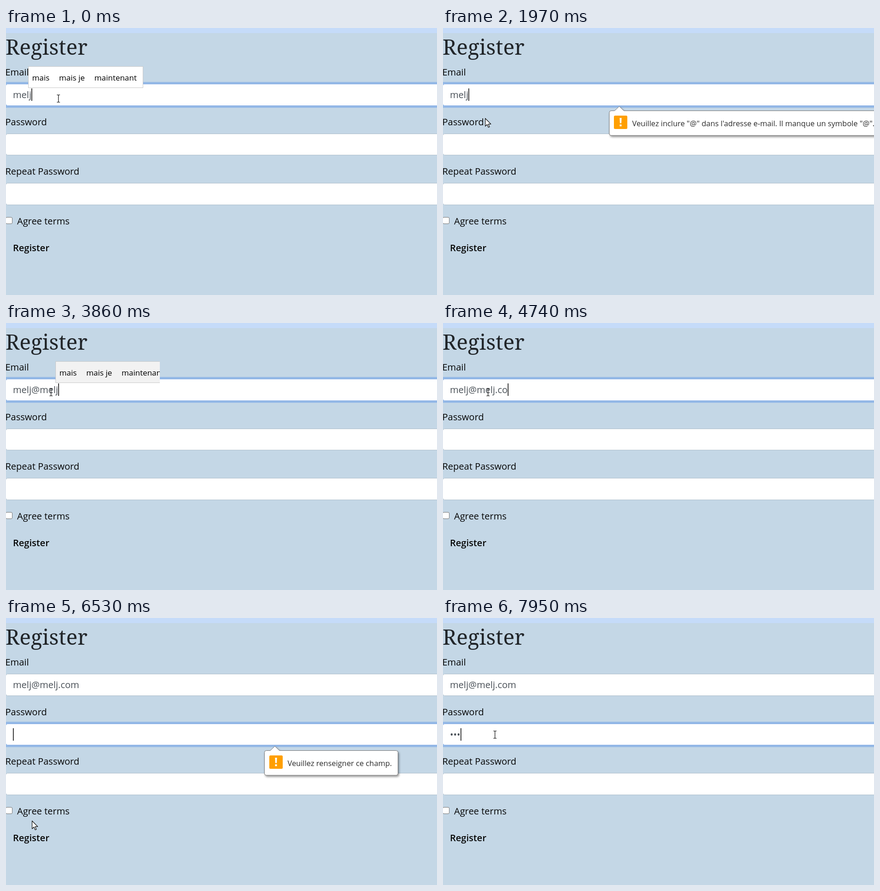
These frames come from a looping animation (933 px wide and 579 px high, 8 s). An HTML page:

```html
<!DOCTYPE html>
<html lang="en">
<head>
<meta charset="utf-8">
<title>Register form</title>
<style>
html, body { margin: 0; width: 100%; height: 100%; overflow: hidden; background: #c4d7e6; }
svg { position: absolute; left: 0; top: 0; }
text { font-family: "Open Sans", sans-serif; font-size: 20px; fill: #060606; }
.title { font-family: "Noto Serif", serif; font-size: 46px; fill: #212529; }
.button { font-weight: 600; }
.field { fill: #fff; stroke: #aebecb; }
.focus .field { stroke: #7fa9e4; }
.ring { fill: #95b9e6; visibility: hidden; }
.focus .ring { visibility: visible; }
.value { fill: #495057; }
.tip text { font-size: 16.4px; fill: #2c2c2c; }
.tip .box { fill: #fff; stroke: #777; }
.menu text { font-size: 16.8px; fill: #222; }
.dots { stroke: #222; stroke-width: 5; stroke-linecap: round; stroke-dasharray: 0 7.3; }
.shade { filter: drop-shadow(2px 3px 2px #0006); }
.cursor path { fill: #fff; stroke: #111; stroke-width: 1.2; stroke-linejoin: round; }
.cursor .beam { fill: none; }
#words {
  position: absolute; top: 83px; height: 45px; box-sizing: content-box;
  display: flex; gap: 20.5px; padding: 0 12.5px 0 7.5px;
  border: 1px solid #c9c9c9; white-space: nowrap; color: #000;
  font: 17px/47px "Open Sans", sans-serif;
}
</style>
</head>
<body>
<svg width="933" height="579" viewBox="0 0 933 579">
  <defs>
    <g id="globe">
      <circle r="9.5" fill="#5f6368"/>
      <path d="M-7.4-.8l5 4.8v3.2A7.6 7.6 0 0 1-7.4-.8M1-7.4v2l-2 2h-2v2h5l1.5 3.5 2.5.5.5 1.8A7.6 7.6 0 0 0 1-7.4" fill="#fff"/>
    </g>
    <g id="warn">
      <rect x="370" y="190" width="29" height="29" rx="2.5" fill="#ff9f00"/>
      <path d="M382.4 195h4.2l-.5 11.5h-3.2zM382.5 209.3h4v4h-4z" fill="#fff"/>
    </g>
  </defs>
  <rect width="933" height="579" fill="#c4d7e6"/>
  <rect width="933" height="11" fill="#c5dbf9"/>

  <text class="title" x="-1" y="58">Register</text>
  <text x="-1.5" y="103">Email</text>
  <text x="-1.5" y="211">Password</text>
  <text x="-1.5" y="318">Repeat Password</text>
  <text x="24" y="426">Agree terms</text>
  <text class="button" x="15" y="484">Register</text>
  <rect x="-.5" y="410.5" width="14" height="14" rx="2.5" fill="#fff" stroke="#767676"/>

  <g id="email">
    <rect class="ring" x="-5" y="117" width="960" height="56" rx="7"/>
    <rect class="field" x="-.5" y="121.5" width="960" height="47" rx="4"/>
    <text class="value" x="15" y="152"></text>
  </g>
  <g id="pass">
    <rect class="ring" x="-5" y="225" width="960" height="55" rx="7"/>
    <rect class="field" x="-.5" y="229.5" width="960" height="46" rx="4"/>
    <text class="value" x="15" y="259.5"></text>
  </g>
  <rect class="field" x="-.5" y="336.5" width="960" height="47" rx="4"/>
  <rect id="caret" width="1.6" height="27" fill="#111"/>

  <g id="menu" class="menu">
    <path class="shade" d="M0 276h284v239q0 4-4 4H0z" fill="#fff"/>
    <path d="M0 276.5h283" stroke="#aebecb"/>
    <path d="M0 462.5h284" stroke="#d9dbdd"/>
    <use href="#globe" x="26.5" y="327"/>
    <text x="54.5" y="319">dorimek@melj.com</text>
    <path class="dots" d="M58.3 343h45"/>
    <use href="#globe" x="26.5" y="407.5"/>
    <text x="54.5" y="399">dorimek</text>
    <path class="dots" d="M58.3 424h45"/>
    <text x="15" y="498">Gérer les mots de passe…</text>
  </g>

  <g id="tipMail" class="tip">
    <path class="box shade" d="M364 179.5h7.5l10-9.5 10 9.5H1000v53.5H364q-4 0-4-4v-45.5q0-4 4-4z"/>
    <use href="#warn"/>
    <text x="409.5" y="213">Veuillez inclure "@" dans l'adresse e-mail. Il manque un symbole "@".</text>
  </g>
  <g id="tipPass" class="tip" transform="translate(199.5 108)">
    <path class="box shade" d="M364 179.5h8.5l10-9.5 10 9.5H645q4 0 4 4v45.5q0 4-4 4H364q-4 0-4-4v-45.5q0-4 4-4z"/>
    <use href="#warn" x=".5"/>
    <text x="410" y="213">Veuillez renseigner ce champ.</text>
  </g>

  <g id="cursor" class="cursor">
    <path class="beam" d="M-3.5-8h2.5l1 1 1-1h2.5M0-7V7M-3.5 8h2.5l1-1 1 1h2.5"/>
    <path class="arrow" d="M0 0v17l4-3.7 2.7 6.2 2.6-1.1-2.7-6h5.6z"/>
    <path class="hand" d="M-2 1.5q0-2 2-2t2 2v7q0-1.7 1.8-1.7t1.8 1.8v.8q.2-1.4 1.8-1.4t1.7 1.8v.8q.2-1 1.2-1t1.4 1.6v5q0 3-1.5 4.5v2.5h-8v-1.8L-6 13.5q-1.6-2-.6-3t2.8.6l1.8 2z"/>
  </g>
</svg>
<div id="words"></div>

<script>
const LOOP = 8000;
const ADDRESS = "melj@melj.com";
const $ = id => document.getElementById(id);

// Each track holds [start, ...values]; the last started entry is shown.
const tracks = {
  typed: [[0, 4], [3310, 5], [3570, 6], [3740, 7], [3860, 9], [4470, 10], [4620, 11], [4740, 12], [4890, 13]],
  bullets: [[0, 0], [7570, 1], [7830, 2], [7950, 3]],
  focus: [[0, "email"], [6290, "pass"]],
  caret: [[0, 1], [500, 0], [980, 1], [1460, 0], [1610, 1], [2120, 0], [2630, 1], [3190, 0], [3430, 1],
    [5410, 0], [5930, 1], [6780, 0], [7290, 1]],
  tipMail: [[0, 0], [1610, .5], [1730, 1], [3430, .6], [3570, 0]],
  tipPass: [[0, 0], [6290, .5], [6410, 1], [7570, .5], [7690, 0]],
  menu: [[0, 0], [7020, 1], [7570, 0]],
  words: [
    [0, 48, "mais,mais je,maintenant", "#fff"],
    [250, 54, "mails,mal,mai", "#fff"],
    [1340, 54, "mails,mal,mai", "#f2f2f2"],
    [1460, 0, ""],
    [3860, 107, "mais,mais je,maintenant", "#f2f2f2", 333],
    [3980, 107, "mais,mais je,maintenant", "#fff"],
    [4100, 112, "mails,mal,mai", "#fff"],
    [4470, 0, ""],
    [5040, 158, "comme,comme tu,comment", "#fff"],
    [6050, 158, "comme,comme tu,comment", "#f2f2f2"],
    [6170, 0, ""]
  ],
  cursor: [
    [0, 113, 153, "beam"], [500, 112, 160, "beam"], [620, 106, 197, "arrow"], [740, 96, 262, "beam"],
    [860, 84, 348, "beam"], [980, 70, 425, "arrow"], [1100, 60, 474, "hand"], [1220, 55, 491, "hand"],
    [1340, 54, 484, "hand"], [1730, 60, 420, "arrow"], [1850, 76, 300, "arrow"], [1970, 91, 196, "arrow"],
    [2120, 96, 160, "beam"], [2240, 97, 153, "beam"], [2360, 97, 150, "beam"],
    [5660, 76, 280, "arrow"], [5780, 51, 371, "arrow"], [5930, 46, 463, "hand"], [6050, 47, 478, "hand"],
    [6410, 56, 440, "arrow"], [6540, 74, 385, "arrow"], [6660, 92, 315, "arrow"],
    [6780, 107, 264, "beam"], [6900, 112, 253, "beam"]
  ]
};

const at = (name, t) => tracks[name].findLast(step => step[0] <= t).slice(1);
const fields = { email: $("email"), pass: $("pass") };
const valueOf = name => fields[name].querySelector(".value");
const pointers = ["beam", "arrow", "hand"].map(name => [name, $("cursor").querySelector("." + name)]);
const show = (el, on) => { el.style.display = on ? "" : "none"; };

function setText(el, text) {
  if (el.textContent !== text) el.textContent = text;
}

function drawWords(t) {
  const [left, list, color, right] = at("words", t);
  const box = $("words");
  show(box, list);
  if (!list) return;
  if (box.dataset.list !== list) {
    box.dataset.list = list;
    box.replaceChildren(...list.split(",").map(word => {
      const span = document.createElement("span");
      span.textContent = word;
      return span;
    }));
  }
  box.style.left = left + "px";
  box.style.background = color;
  box.style.clipPath = right ? `inset(0 calc(100% - ${right - left}px) 0 0)` : "none";
}

function drawCaret(t, focus) {
  const value = valueOf(focus);
  const width = value.textContent ? value.getComputedTextLength() : 0;
  const caret = $("caret");
  caret.setAttribute("x", Math.round(15 + width));
  caret.setAttribute("y", focus === "email" ? 131 : 239);
  show(caret, at("caret", t)[0]);
}

function drawCursor(t) {
  const [x, y, kind] = at("cursor", t);
  $("cursor").setAttribute("transform", `translate(${x + .5} ${y})`);
  for (const [name, path] of pointers) show(path, name === kind);
}

function draw(t) {
  const [focus] = at("focus", t);
  setText(valueOf("email"), ADDRESS.slice(0, at("typed", t)[0]));
  setText(valueOf("pass"), "•".repeat(at("bullets", t)[0]));
  for (const name in fields) fields[name].classList.toggle("focus", name === focus);
  for (const name of ["tipMail", "tipPass", "menu"]) $(name).style.opacity = at(name, t)[0];
  drawWords(t);
  drawCaret(t, focus);
  drawCursor(t);
}

const start = performance.now();
function tick() {
  draw((performance.now() - start) % LOOP);
  requestAnimationFrame(tick);
}
tick();
</script>
</body>
</html>
```
